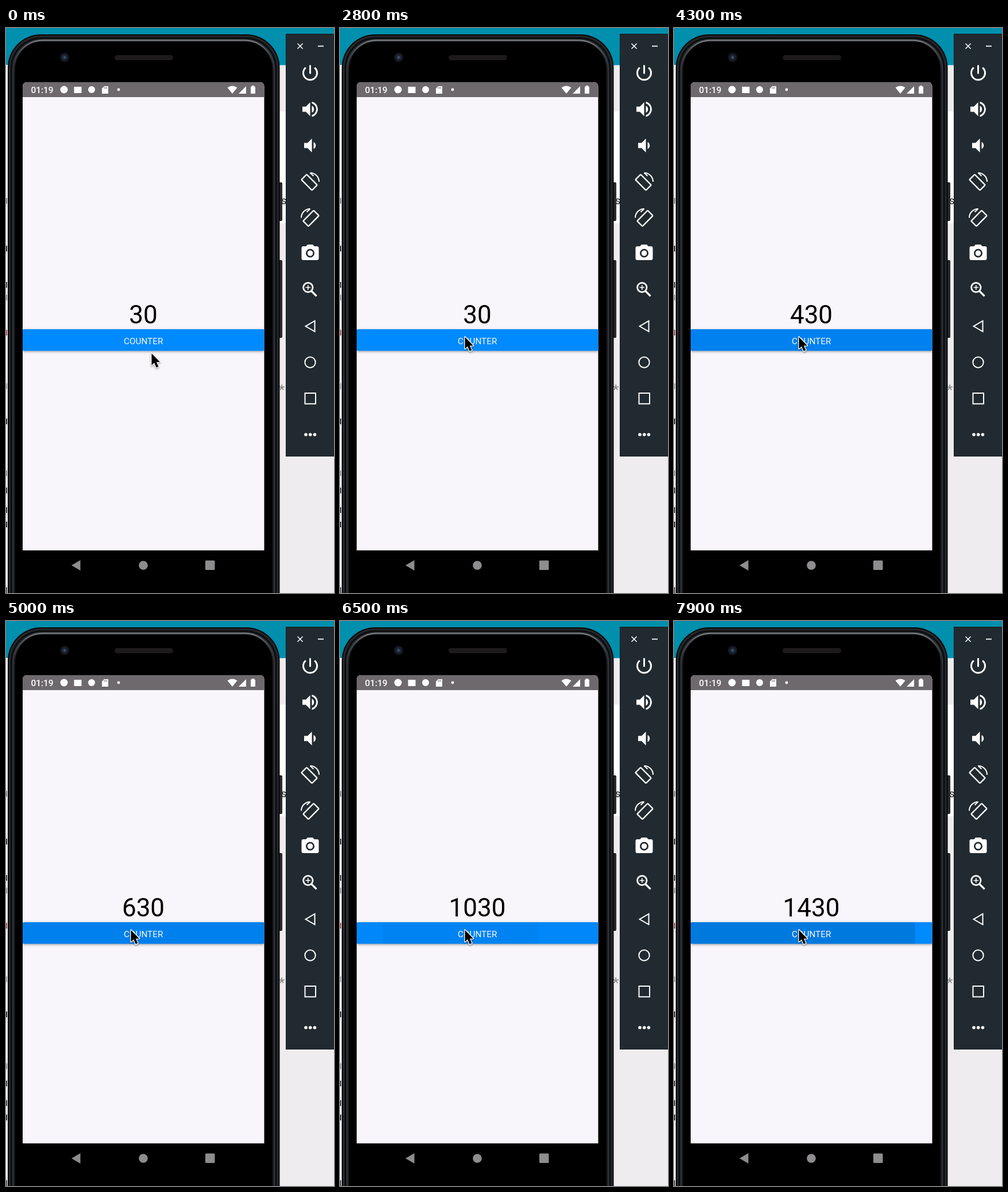
An HTML page with a canvas that plays this animation: 571x981 px, repeating every 8 s.

```html
<!DOCTYPE html>
<html lang="en">
<head>
<meta charset="utf-8">
<title>Counter</title>
<style>
  html, body { margin: 0; width: 100%; height: 100%; overflow: hidden; background: #eeecee; }
  canvas { display: block; width: 571px; height: 981px; }
</style>
</head>
<body>
<canvas id="stage" width="571" height="981"></canvas>
<script>
const W = 571, H = 981, LOOP = 8000, STEP = 100;
const FONT = 'Roboto, sans-serif';
const BUTTON = { x: 29, y: 523, w: 420.5, h: 37.5 };
const PRESSES = [2875, 3250, 3600, 3950, 4334, 4668, 5002, 5336, 5670, 6065, 6460, 6890, 7320, 7750];
const RELEASE = 110;

const stage = document.getElementById('stage').getContext('2d');
const backdrop = document.createElement('canvas');
backdrop.width = W;
backdrop.height = H;
let c = backdrop.getContext('2d');

const clamp = v => Math.max(0, Math.min(1, v));
const mix = (a, b, k) => a + (b - a) * k;
const ease = k => k * k * (3 - 2 * k);

function rect(x, y, w, h, color, radius = 0) {
  c.fillStyle = color;
  c.beginPath();
  c.roundRect(x, y, w, h, radius);
  c.fill();
}

function disc(x, y, r, color) {
  c.fillStyle = color;
  c.beginPath();
  c.arc(x, y, r, 0, Math.PI * 2);
  c.fill();
}

function ring(x, y, r, width) {
  c.lineWidth = width;
  c.beginPath();
  c.arc(x, y, r, 0, Math.PI * 2);
  c.stroke();
}

function poly(points, color) {
  c.fillStyle = color;
  c.beginPath();
  points.forEach(([x, y]) => c.lineTo(x, y));
  c.closePath();
  c.fill();
}

function line(points, width, closed) {
  c.lineWidth = width;
  c.beginPath();
  points.forEach(([x, y]) => c.lineTo(x, y));
  if (closed) c.closePath();
  c.stroke();
}

function text(str, x, y, font, color, align = 'left') {
  c.font = `${font} ${FONT}`;
  c.fillStyle = color;
  c.textAlign = align;
  c.fillText(str, x, y);
}

// Icons are described on a 24 unit grid, centred on the toolbar.
function icon(y, path) {
  c.save();
  c.translate(511.5, y - 18);
  c.scale(1.5, 1.5);
  c.fillStyle = '#fff';
  c.fill(new Path2D(path), 'evenodd');
  c.restore();
}

function drawDesktop() {
  rect(0, 0, W, H, '#eeecee');
  rect(0, 0, W, 64.5, '#008fad');
  rect(0, 64, 6, H, '#f4f3f4');
  rect(470, 145, 20, 194, '#fff');
  text('s', 479, 306, '18px', '#222');
  text('*', 475, 636, '24px', '#888');
  const scraps = [[295, '#888'], [378, '#333'], [441, '#444'], [463, '#999'], [524, '#a55'], [617, '#aaa'],
    [678, '#333'], [768, '#999'], [798, '#444'], [832, '#444'], [857, '#333'], [971, '#555']];
  scraps.forEach(([y, color]) => rect(0, y, 2, 10, color));
}

function drawPhone() {
  rect(473, 268, 8, 67, '#1d1e21', 2);
  rect(473, 403, 8, 135, '#1d1e21', 2);
  rect(478.5, 270, 1, 63, '#45474a');
  rect(478.5, 405, 1, 131, '#45474a');

  const shells = [[0, '#08090a'], [2, '#24272b'], [5, '#0c0d0f'], [8, '#303338'], [10.5, '#15171a'], [13, '#000']];
  shells.forEach(([d, color]) => rect(3 + d, 11 + d, 473.5 - 2 * d, 1060, color, 58 - d * .8));

  const shine = c.createLinearGradient(0, 18, 0, 80);
  shine.addColorStop(0, '#8b8d90');
  shine.addColorStop(.3, '#55585c');
  shine.addColorStop(1, 'rgba(48,51,56,0)');
  c.strokeStyle = shine;
  c.lineWidth = 2;
  c.beginPath();
  c.roundRect(14, 21.5, 451.5, 1060, 50);
  c.stroke();

  rect(189, 47, 102, 9, '#1d1a1b', 4.5);
  disc(102, 51, 8, '#14171d');
  disc(102, 51, 5, '#1c2838');
  disc(102, 51, 2.2, '#375270');

  rect(29, 94, 420.5, 813, '#f8f6fa', [7, 7, 0, 0]);
  rect(29, 94, 420.5, 26, '#6e696c', [7, 7, 0, 0]);

  const gray = '#8e8c8e';
  poly([[114, 933], [129.5, 924], [129.5, 942]], gray);
  disc(239, 933, 7.8, gray);
  rect(347, 924.5, 16.5, 16.5, gray, 1.5);
}

function drawStatus() {
  const white = '#fff';
  text('01:19', 43.5, 113, '500 15.4px', white);
  disc(101, 107, 6.5, white);
  rect(118.5, 102, 13, 11, white);
  disc(149, 107, 6, white);
  poly([[171, 101], [178, 101], [178, 114], [167, 114], [167, 105]], white);
  for (let i = 0; i < 3; i++) rect(170.5 + i * 2.2, 102.5, 1, 3, '#6e696c');
  disc(196, 107, 2.4, white);

  c.fillStyle = white;
  c.beginPath();
  c.moveTo(394, 114);
  c.lineTo(385.5, 103.5);
  c.quadraticCurveTo(394, 97.5, 402.5, 103.5);
  c.fill();
  poly([[405, 114], [418, 114], [418, 101]], white);
  rect(426, 101.5, 8, 12.5, white, 1);
  rect(428, 100, 4, 2, white);
}

function drawRotate(y, flip) {
  c.save();
  c.translate(529.5, y);
  c.scale(flip, 1);
  c.lineWidth = 2.4;
  c.save();
  c.translate(-1.5, 1);
  c.rotate(Math.PI / 4);
  c.beginPath();
  c.roundRect(-13, -6.5, 26, 13, 1.5);
  c.stroke();
  c.restore();
  c.lineWidth = 2;
  c.beginPath();
  c.arc(0, 0, 15.5, -Math.PI / 2, 0);
  c.stroke();
  line([[0, -15.5], [6, -10]], 2);
  c.restore();
}

function drawToolbar() {
  rect(487, 10, 84, 734, '#151c20');
  rect(488, 11, 83, 732, '#212a30');
  c.strokeStyle = '#fff';
  line([[507.5, 27], [516.5, 36]], 1.6);
  line([[516.5, 27], [507.5, 36]], 1.6);
  line([[543, 31.5], [553, 31.5]], 1.8);

  icon(78, 'M13 3h-2v10h2zM17.83 5.17l-1.42 1.42A7 7 0 1 1 7.58 6.58L6.17 5.17A9 9 0 1 0 17.83 5.17z');
  icon(141, 'M3 9v6h4l5 5V4L7 9zM14 7.97v8.05a4.5 4.5 0 0 0 0-8.05zM14 3.23v2.06a7 7 0 0 1 0 13.42v2.06a9 9 0 0 0 0-17.54z');
  icon(204, 'M5 9v6h4l5 5V4L9 9zM16 7.97v8.05a4.5 4.5 0 0 0 0-8.05z');
  drawRotate(267, 1);
  drawRotate(329.5, -1);
  icon(391, 'M9 2L7.17 4H4a2 2 0 0 0-2 2v12a2 2 0 0 0 2 2h16a2 2 0 0 0 2-2V6a2 2 0 0 0-2-2h-3.17L15 2zM12 7a5 5 0 0 1 0 10a5 5 0 0 1 0-10zM12 8.8a3.2 3.2 0 0 0 0 6.4a3.2 3.2 0 0 0 0-6.4z');

  ring(525.8, 450.5, 8.2, 2.8);
  line([[531.5, 456.5], [540.5, 465.5]], 3.2);
  line([[521.5, 450.5], [530, 450.5]], 1.6);
  line([[525.8, 446.3], [525.8, 454.7]], 1.6);
  line([[521.5, 517.8], [537.5, 508.5], [537.5, 527]], 2, true);
  ring(529.5, 580.5, 9.2, 2);
  c.lineWidth = 2;
  c.strokeRect(520.5, 634, 18.5, 18.5);
  [522, 529.7, 537.4].forEach(x => disc(x, 706, 2.8, '#fff'));
}

function rippleAlpha(age) {
  return .125 * (age < 225 ? clamp(age / 150) : clamp((475 - age) / 250));
}

function drawButton(t) {
  const { x, y, w, h } = BUTTON;
  c.save();
  c.shadowColor = 'rgba(0,0,0,.35)';
  c.shadowBlur = 4;
  c.shadowOffsetY = 1.5;
  rect(x, y, w, h, '#008aff', 2);
  c.restore();

  c.save();
  c.beginPath();
  c.roundRect(x, y, w, h, 2);
  c.clip();
  for (const press of PRESSES) {
    const age = t - press;
    if (age > 0 && age < 475) {
      disc(210, 543, 110 + 150 * clamp(age / 225), `rgba(0,0,0,${rippleAlpha(age)})`);
    }
  }
  c.restore();
  text('COUNTER', 239.2, 548.5, '15.3px', '#f4f9ff', 'center');
}

function drawCursor(t) {
  const sweep = ease(clamp(t / 400));
  const settle = ease(clamp((t - 500) / 400));
  const x = mix(mix(253.5, 212, sweep), 217.5, settle);
  const y = mix(mix(565, 531, sweep), 536.5, settle);
  c.save();
  c.translate(x, y);
  const arrow = new Path2D('M0 0V20.5L4.6 16.3L8.2 24.6L12 23L8.4 14.9H14.6z');
  c.lineJoin = 'round';
  c.shadowColor = 'rgba(0,0,0,.4)';
  c.shadowBlur = 3;
  c.shadowOffsetY = 1.5;
  c.strokeStyle = '#fff';
  c.lineWidth = 2.6;
  c.stroke(arrow);
  c.shadowColor = 'transparent';
  c.fillStyle = '#000';
  c.fill(arrow);
  c.restore();
}

function render() {
  const t = Math.floor((performance.now() % LOOP) / STEP) * STEP;
  const count = 30 + 100 * PRESSES.filter(p => t >= p + RELEASE).length;
  c.drawImage(backdrop, 0, 0);
  text(count, 239, 512.5, '44px', '#000', 'center');
  drawButton(t);
  drawCursor(t);
  requestAnimationFrame(render);
}

drawDesktop();
drawPhone();
drawStatus();
drawToolbar();
c = stage;
render();
</script>
</body>
</html>
```
